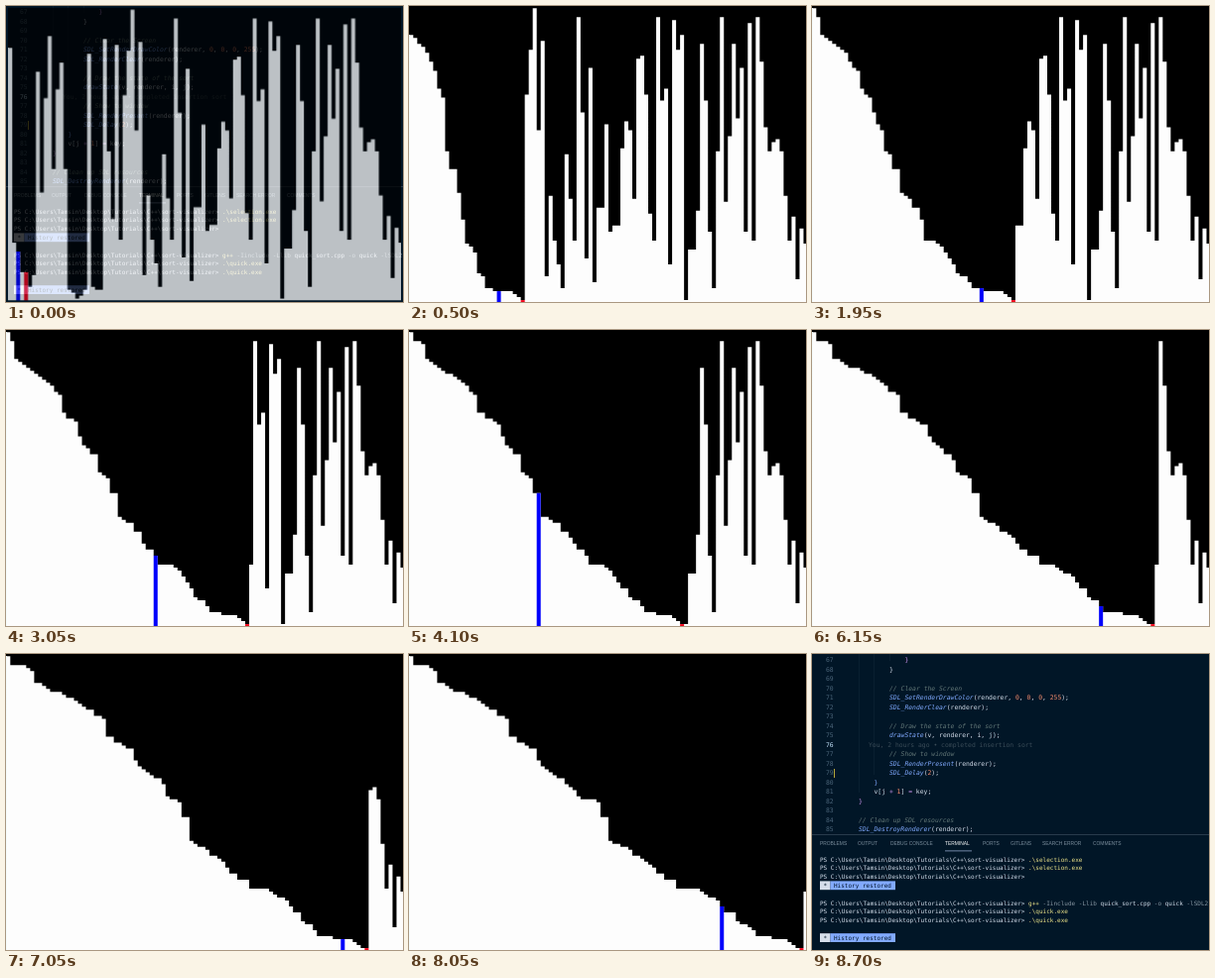
These frames come from a looping animation (400x299 px, 8.75 s). An HTML page with a canvas:

```html
<!DOCTYPE html>
<html lang="en">
<head>
<meta charset="utf-8">
<title>Insertion sort</title>
<style>
  html, body { margin: 0; width: 100%; height: 100%; overflow: hidden; background: #011627; }
  #stage { position: relative; width: 400px; height: 299px; overflow: hidden; }
  svg, canvas { position: absolute; left: 0; top: 0; }
  text { white-space: pre; font-family: "DejaVu Sans Mono", "Liberation Mono", monospace; }
  .code { font-size: 6.4px; }
  .term { font-size: 6.02px; }
  .tab { font: 4.9px "Liberation Sans", Arial, sans-serif; }
</style>
</head>
<body>
<div id="stage">
  <svg id="desk" width="400" height="299"></svg>
  <canvas id="win" width="400" height="299"></canvas>
</div>
<script>
const LOOP = 8750, TICK = 50, W = 400, H = 299, BAR = 4, UNIT = 3;
const ZOOM = 1.003, SHIFT_X = .3, SHIFT_Y = .2;
const SORT_END = 8170, CLOSE_MS = 170, OPEN_MS = 100;

const start = [
  86, 20, 17, 10, 19, 5, 9, 78, 37, 69, 90, 45, 72, 81, 45, 4, 3, 1, 2, 4,
  84, 5, 4, 4, 89, 51, 28, 87, 21, 70, 85, 99, 58, 88, 9, 36, 21, 13, 5, 50,
  35, 21, 96, 64, 15, 79, 7, 32, 32, 60, 24, 26, 26, 52, 61, 58, 35, 82, 83, 70,
  30, 21, 96, 68, 72, 13, 95, 85, 90, 1, 18, 18, 31, 87, 68, 24, 5, 51, 96, 34,
  56, 87, 62, 79, 24, 94, 21, 96, 81, 59, 51, 54, 55, 51, 36, 21, 29, 8, 25, 20
];

// ---- desktop behind the sort window ----
const NS = "http://www.w3.org/2000/svg";
const desk = document.getElementById("desk");

function add(parent, tag, attrs, content) {
  const el = document.createElementNS(NS, tag);
  for (const k in attrs) el.setAttribute(k, attrs[k]);
  if (content) el.textContent = content;
  parent.appendChild(el);
  return el;
}
const rect = (x, y, width, height, fill) => add(desk, "rect", { x, y, width, height, fill });

function write(cls, x, y, runs) {
  const line = add(desk, "text", { class: cls, x, y });
  for (const [str, fill, style] of runs)
    add(line, "tspan", { fill, "font-style": style || "normal" }, str);
}

const FG = "#d6deeb", FN = "#82aaff", NUM = "#f78c6c", NOTE = "#637777", KEY = "#c792ea", CMD = "#f0e58a";
const note = s => [[s, NOTE, "italic"]];
const call = (name, args) => [
  [name, FN, "italic"], ["(", FG],
  ...args.split(/(\d+)/).map(s => [s, /\d/.test(s) ? NUM : FG]),
  [");", FG]
];

// line number, indent depth, coloured runs
const code = [
  [67, 4, [["}", KEY]]],
  [68, 3, [["}", FG]]],
  [70, 3, note("// Clear the Screen")],
  [71, 3, call("SDL_SetRenderDrawColor", "renderer, 0, 0, 0, 255")],
  [72, 3, call("SDL_RenderClear", "renderer")],
  [74, 3, note("// Draw the state of the sort")],
  [75, 3, call("drawState", "v, renderer, i, j")],
  [77, 3, note("// Show to window")],
  [78, 3, call("SDL_RenderPresent", "renderer")],
  [79, 3, call("SDL_Delay", "2")],
  [80, 2, [["}", FN]]],
  [81, 2, [["v[j ", FG], ["+ ", KEY], ["1", NUM], ["] ", FG], ["= ", KEY], ["key;", FG]]],
  [82, 1, [["}", KEY]]],
  [84, 1, note("// Clean up SDL resources")],
  [85, 1, call("SDL_DestroyRenderer", "renderer")]
];

function buildDesk() {
  const lineY = n => 8.3 + (n - 67) * 9.5;
  rect(0, 0, W, H, "#011627");
  rect(47, 0, .5, 140, "#12293b");
  rect(62.5, 0, .5, 122, "#12293b");
  rect(78, 0, .5, 7, "#12293b");
  for (let n = 67; n <= 85; n++)
    write("code", 14, lineY(n), [[String(n), n === 76 ? "#c5e4fd" : "#4b6479"]]);
  for (const [n, depth, runs] of code) write("code", 31.5 + depth * 15.5, lineY(n), runs);
  write("code", 57, lineY(76), [["You, 2 hours ago • completed insertion sort", "#3b4c58"]]);
  rect(22, 116, 1, 9, "#b3a83a");

  rect(0, 182, W, 117, "#011627");
  rect(0, 182, W, .7, "#3a4b5c");
  const tabs = { PROBLEMS: 8, OUTPUT: 46, "DEBUG CONSOLE": 79, TERMINAL: 134, PORTS: 172,
    GITLENS: 200, "SEARCH ERROR": 232, COMMENTS: 283 };
  for (const name in tabs)
    write("tab", tabs[name], 193.3, [[name, name === "TERMINAL" ? "#ffffff" : "#7d8f9e"]]);
  rect(134, 198.5, 27, .8, "#8fa3c8");

  const prompt = "PS C:\\Users\\Tamsin\\Desktop\\Tutorials\\C++\\sort-visualizer> ";
  const rowY = r => 209.5 + r * 8.8;
  const shell = [
    [0, [[".\\selection.exe", CMD]]],
    [1, [[".\\selection.exe", CMD]]],
    [2, []],
    [5, [["g++ ", CMD], ["-Iinclude -Llib ", "#8795a1"], ["quick_sort.cpp ", FG],
      ["-o ", "#8795a1"], ["quick ", FG], ["-lSDL2", "#8795a1"]]],
    [6, [[".\\quick.exe", CMD]]],
    [7, [[".\\quick.exe", CMD]]]
  ];
  for (const [r, runs] of shell) write("term", 8, rowY(r), [[prompt, FG], ...runs]);
  for (const r of [3, 9]) {
    rect(8, rowY(r) - 6.5, 10.5, 8.8, FG);
    rect(18.5, rowY(r) - 6.5, 65.5, 8.8, FN);
    write("term", 11.6, rowY(r), [["*", "#011627"]]);
    write("term", 22, rowY(r), [["History restored", "#011627"]]);
  }
}

// ---- insertion sort, largest first: one entry per drawn step ----
function sortSteps(v) {
  const list = [];
  for (let i = 1; i < v.length; i++) {
    const key = v[i];
    let j = i - 1;
    while (j >= 0 && v[j] < key) {
      v[j + 1] = v[j];
      j--;
      list.push({ i, j, v: v.slice() });
    }
    v[j + 1] = key;
  }
  return list;
}
const steps = sortSteps(start.slice());

// pace of the sort: time, i, j
const pace = [[0, 4, 2], [500, 28, 22], [1950, 50, 42], [4100, 68, 32], [5200, 78, 7], [7050, 90, 84]]
  .map(([t, i, j]) => [t, steps.findIndex(s => s.i === i && s.j === j)]);
pace.push([SORT_END, steps.length - 1]);

function stepAt(t) {
  const k = pace.findIndex(p => p[0] > t);
  if (k < 0) return steps[steps.length - 1];
  const [t0, n0] = pace[k - 1], [t1, n1] = pace[k];
  return steps[Math.round(n0 + (n1 - n0) * (t - t0) / (t1 - t0))];
}

const win = document.getElementById("win");
const ctx = win.getContext("2d");

function drawBars({ i, j, v }) {
  const top = n => H - v[n] * UNIT;
  const bar = (n, fill) => {
    ctx.fillStyle = fill;
    ctx.fillRect(n * BAR, top(n), BAR, H);
  };
  ctx.setTransform(1, 0, 0, 1, 0, 0);
  ctx.fillStyle = "#000";
  ctx.fillRect(0, 0, W, H);
  ctx.fillStyle = "#e2fafa";
  ctx.fillRect(0, top(0), 1, H);

  // the window picture is slightly enlarged
  ctx.setTransform(ZOOM, 0, 0, ZOOM, SHIFT_X, SHIFT_Y);
  ctx.fillStyle = "#fdfdfd";
  ctx.beginPath();
  ctx.moveTo(0, H);
  v.forEach((_, n) => {
    ctx.lineTo(n * BAR, top(n));
    ctx.lineTo((n + 1) * BAR, top(n));
  });
  ctx.lineTo(W, H);
  ctx.fill();
  bar(i, "#f00018");
  if (j >= 0) bar(j, "#0000fc");
}

function render(t) {
  const opened = Math.min(1, t / OPEN_MS);
  const closed = Math.max(0, Math.min(1, (t - SORT_END) / CLOSE_MS));
  win.style.opacity = (.74 + .26 * opened) * (1 - closed);
  win.style.transform = `scale(${.99 + .01 * opened - .03 * closed})`;
  drawBars(stepAt(t));
}

buildDesk();
const begin = performance.now();
function loop() {
  const t = (performance.now() - begin) % LOOP;
  render(Math.floor(t / TICK) * TICK);
  requestAnimationFrame(loop);
}
loop();
</script>
</body>
</html>
```
